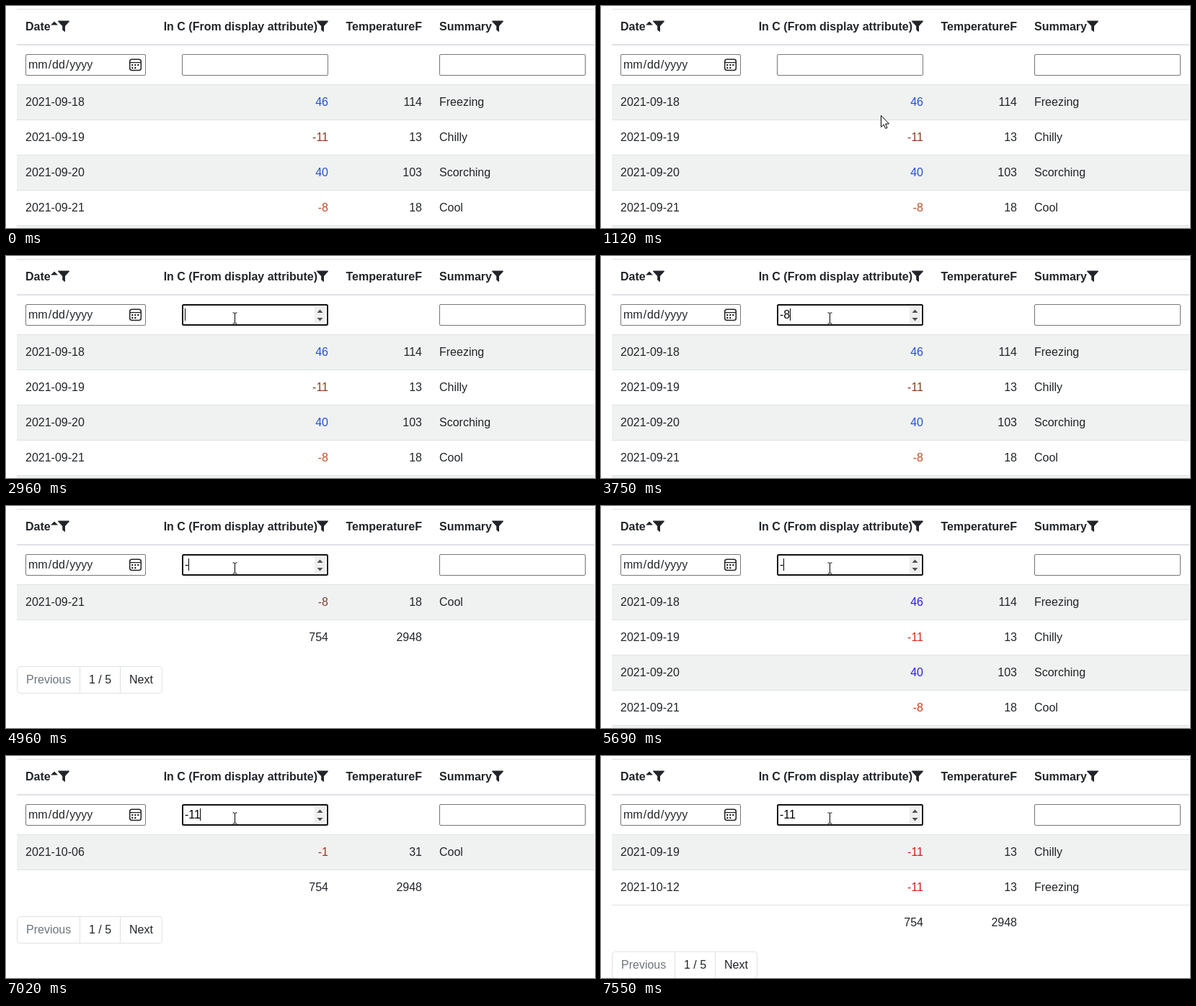
Recreate the animation shown at these times as an HTML page. Size 817x309 px, loop 8000 ms.

```html
<!DOCTYPE html>
<html lang="en">
<head>
<meta charset="utf-8">
<title>Filtered table</title>
<style>
  html, body { margin: 0; width: 100%; height: 100%; overflow: hidden; background: #fff; }
  svg { display: block; width: 817px; height: 309px; }
  text { font: 16px "Liberation Sans", Arial, sans-serif; fill: #212529; }
  .b { font-weight: bold; }
  .r { text-anchor: end; }
</style>
</head>
<body>
<svg id="stage" viewBox="0 0 817 309">
  <defs>
    <path id="funnel" fill="#212529" d="M.6.5H15.4Q16.4.8 15.7 1.8L10 8V15.2Q9.7 16.2 8.8 15.5L6.2 13.3V8L.3 1.8Q-.4.8.6.5Z"/>
    <path id="arrow" fill="#fff" stroke="#000" d="M.5.5V16.5L4.2 13L6.7 18.5L9 17.5L6.6 12H11.5Z"/>
    <path id="beam" fill="none" stroke="#000" d="M-3-7.5H-1L0-6.5L1-7.5H3M0-6.5V6.5M-3 7.5H-1L0 6.5L1 7.5H3"/>
  </defs>
  <g id="head"></g>
  <g id="body"></g>
  <g id="field"></g>
  <g id="mouse"></g>
</svg>
<script>
const LOOP = 8000, ROW = 49, TOP = 109, LINE = '#dee2e6';
const $ = id => document.getElementById(id);

const text = (x, y, s, cls = '', fill = '') =>
  `<text x="${x}" y="${y}" class="${cls}"${fill && ` style="fill:${fill}"`}>${s}</text>`;
const rect = (x, y, w, h, fill, more = '') =>
  `<rect x="${x}" y="${y}" width="${w}" height="${h}" fill="${fill}" ${more}/>`;
const use = (id, x, y) => `<use href="#${id}" x="${x}" y="${y}"/>`;
const box = (x, w, color = '#767676', line = 1) =>
  rect(x + line / 2, 67 + line / 2, w - line, 30 - line, '#fff',
    `rx="1.5" stroke="${color}" stroke-width="${line}"`);

function header() {
  const dots = [[175, 82], [179, 82], [183, 82], [175, 86], [179, 86]]
    .map(([x, y]) => `<circle cx="${x + .3}" cy="${y + .2}" r="1.1"/>`).join('');
  return rect(15, 4, 801, 1, LINE) + rect(15, 53, 801, 2, LINE) +
    text(27, 34, 'Date', 'b') + text(432, 34, 'In C (From display attribute)', 'b r') +
    text(577, 34, 'TemperatureF', 'b r') + text(601, 34, 'Summary', 'b') +
    '<path d="M62 26.5L67 21.5L72 26.5Z" fill="#212529"/>' +
    [72, 431, 674].map(x => use('funnel', x, 20)).join('') +
    box(27, 167) + box(601, 203) +
    text(31, 87, 'mm') + text(58.7, 87, '/') + text(64.1, 87, 'dd') +
    text(82.9, 87, '/') + text(88.3, 87, 'yyyy') +
    rect(171.7, 74.2, 15.6, 15.2, 'none', 'rx="3" stroke="#222" stroke-width="1.5"') +
    rect(172, 78, 15, 1.3, '#222') + dots;
}

// Rows: date, Celsius, Fahrenheit, summary, Celsius colour
const all = (blue, red, cool) => [
  ['2021-09-18', 46, 114, 'Freezing', blue],
  ['2021-09-19', -11, 13, 'Chilly', red],
  ['2021-09-20', 40, 103, 'Scorching', blue],
  ['2021-09-21', -8, 18, 'Cool', cool],
  ['', '', '', '', '']
];
const views = [
  [0, all('#2450cf', '#8c3c1e', '#bf4f26')],
  [3820, [['2021-09-21', -8, 18, 'Cool', '#7c4334']]],
  [5090, all('#2c1ee0', '#dc2a1c', '#d03a14')],
  [6480, [['2021-10-06', -1, 31, 'Cool', '#a8321c']]],
  [7150, [['2021-09-19', -11, 13, 'Chilly', '#d81a1a'], ['2021-10-12', -11, 13, 'Freezing', '#d81a1a']]]
];

// Time, typed value, caret shown
const typing = [
  [1870, '', 1], [2430, '', 0], [2960, '', 1], [3090, '-', 1], [3620, '-', 0],
  [3750, '-8', 1], [4300, '-8', 0], [4760, '-8', 1], [4960, '-', 1], [5290, '', 1],
  [5690, '-', 1], [6220, '-', 0], [6350, '-1', 1], [6890, '-1', 0], [7020, '-11', 1], [7550, '-11', 0]
];
const caretX = { '': 248, '-': 253, '-8': 262, '-1': 262, '-11': 269 };
const at = (list, t) => list.filter(item => item[0] <= t).pop();

function table(rows) {
  let y = TOP, out = '';
  rows.forEach(([date, c, f, summary, color], i) => {
    if (i % 2 == 0) out += rect(15, y, 801, ROW, '#f0f2f1');
    out += rect(15, y, 801, 1, LINE) + text(27, y + 30, date) +
      text(447, y + 30, c, 'r', color) + text(577, y + 30, f, 'r') + text(601, y + 30, summary);
    y += ROW;
  });
  return rows.length > 2 ? out : out + footer(y);
}

function footer(y) {
  const p = y + 65;
  return rect(15, y, 801, 1, LINE) + text(447, y + 30, 754, 'r') + text(577, y + 30, 2948, 'r') +
    rect(15.5, p + .5, 201, 37, '#fff', `rx="4" stroke="${LINE}"`) +
    rect(102, p, 1, 38, LINE) + rect(158, p, 1, 38, LINE) +
    text(28, p + 24, 'Previous', '', '#6c757d') + text(115, p + 24, '1 / 5') + text(171, p + 24, 'Next');
}

function pointer(t) {
  if (t < 780) return null;
  if (t >= 2230) return [317, 86];
  if (t >= 2150) return [319, 84];
  const p = Math.min(1, Math.floor((t - 780) / 69) / 10);
  const e = 1 - (1 - p) ** 2;
  return [Math.round(510 - 190 * e), Math.round(276 - 193 * e)];
}

function field(t, hover) {
  const state = at(typing, t);
  let out = box(244, 203, state ? '#101010' : hover ? '#4f4f4f' : '#767676', state ? 2 : 1);
  if (hover) out += rect(428, 71, 15, 22, '#efefef') +
    '<path d="M431.5 79L435.5 74.5L439.5 79ZM431.5 86L435.5 90.5L439.5 86Z" fill="#505050"/>';
  if (state) {
    const [, value, caret] = state;
    out += text(248, 87, value, '', '#000');
    if (caret) out += rect(caretX[value], 73, 1, 17, '#000');
  }
  return out;
}

function mouse(t, pos, hover) {
  if (!pos) return '';
  const glow = t >= 1870 && t < 2010 ? '<circle cx="318" cy="82" r="12" fill="#ff0" fill-opacity=".5"/>' : '';
  return glow + (hover ? use('beam', pos[0] + .5, pos[1] + .5) : use('arrow', ...pos));
}

const shown = {};
function put(id, html) {
  if (shown[id] !== html) $(id).innerHTML = shown[id] = html;
}

function draw(now) {
  const t = now % LOOP, pos = pointer(t);
  const hover = !!pos && pos[0] >= 244 && pos[0] < 447 && pos[1] >= 67 && pos[1] < 97;
  put('body', table(at(views, t)[1]));
  put('field', field(t, hover));
  put('mouse', mouse(t, pos, hover));
  requestAnimationFrame(draw);
}

put('head', header());
draw(performance.now());
</script>
</body>
</html>
```
